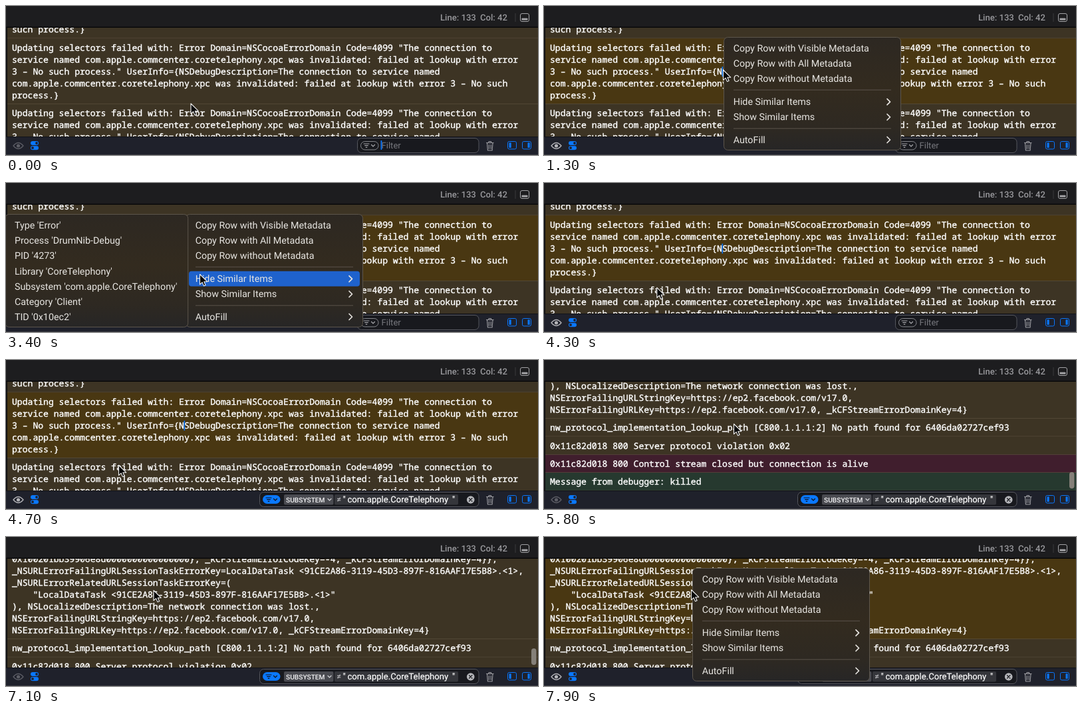
These frames come from a looping animation (800x226 px, 8000 ms). An HTML page:

```html
<!DOCTYPE html>
<html lang="en">
<head>
<meta charset="utf-8">
<title>Console filtering</title>
<style>
  html, body { margin: 0; width: 100%; height: 100%; overflow: hidden; background: #1d1d1f; }
  svg { display: block; width: 800px; height: 226px; }
  text { white-space: pre; text-rendering: geometricPrecision; }
  .log { font: 500 13.08px "Noto Sans Mono", "DejaVu Sans Mono", monospace; fill: #fff; stroke: #fff; stroke-width: 0.4px; }
  .menu { font: 14.3px Roboto, "Open Sans", sans-serif; fill: #e8e6e2; }
  .ui { font: 13.1px Roboto, "Open Sans", sans-serif; }
  .status { font: 500 13.1px Roboto, "Open Sans", sans-serif; fill: #98989c; }
  .token { font: 13.1px Roboto, "Open Sans", sans-serif; fill: #fff; stroke: #fff; stroke-width: 0.2px; }
  .tag { font: 500 10.2px Roboto, "Open Sans", sans-serif; fill: #f2f2f4; }
</style>
</head>
<body>
<svg id="stage" viewBox="0 0 800 226"></svg>
<script>
const LOOP = 8000, LINE = 18, PAD = 9.4, TOP = 33, BOTTOM = 198;
const BROWN = '#3d3424', PICKED = '#493712', RED = '#401e2d', GREEN = '#26392f';
const BLUE = '#0a78ff', ACCENT = '#1f62cc', BAR = '#1f212b';
const stage = document.getElementById('stage');

function el(tag, attrs, parent = stage, text) {
  const node = document.createElementNS('http://www.w3.org/2000/svg', tag);
  for (const key in attrs) node.setAttribute(key, attrs[key]);
  if (text !== undefined) node.textContent = text;
  return parent.appendChild(node);
}
const group = (parent = stage) => el('g', {}, parent);
const box = (x, y, width, height, fill, parent, rx = 0, stroke = 'none') =>
  el('rect', { x, y, width, height, fill, rx, stroke }, parent);
const stroke = (d, color, parent, width = 1.2) =>
  el('path', { d, fill: 'none', stroke: color, 'stroke-width': width, 'stroke-linecap': 'round', 'stroke-linejoin': 'round' }, parent);
const label = (x, y, text, cls, parent, fill) => {
  const node = el('text', { x, y, class: cls }, parent, text);
  if (fill) node.setAttribute('fill', fill);
  return node;
};
const show = (node, on) => node.setAttribute('display', on ? 'inline' : 'none');
const move = (node, x, y) => node.setAttribute('transform', `translate(${x} ${y})`);

// Console contents
const service = 'com.apple.commcenter.coretelephony.xpc was invalidated: failed at lookup with error';
const selectors = [
  'Updating selectors failed with: Error Domain=NSCocoaErrorDomain Code=4099 "The connection to',
  `service named ${service}`,
  '3 – No such process." UserInfo={NSDebugDescription=The connection to service named',
  `${service} 3 – No such`,
  'process.}'
];
const task = 'LocalDataTask <91CE2A86-3119-45D3-897F-816AAF17E5B8>.<1>';
const host = 'https://ep2.facebook.com/v17.0';
const network = [
  `Task <91CE2A86-3119-45D3-897F-816AAF17E5B8>.<1> finished with error [-1005] Error`,
  'Domain=NSURLErrorDomain Code=-1005 "The network connection was lost."',
  'UserInfo={_kCFStreamErrorCodeKey=-4, NSUnderlyingError=0x281d0a3d0 {Error',
  'Domain=kCFErrorDomainCFNetwork Code=-1005 "(null)"',
  'UserInfo={NSErrorPeerAddressKey=<CFData 0x2836e8b40>{length = 16, capacity = 16, bytes =',
  '0x100201bb39906e8d0000000000000000}, _kCFStreamErrorCodeKey=-4, _kCFStreamErrorDomainKey=4}},',
  `_NSURLErrorFailingURLSessionTaskErrorKey=${task},`,
  '_NSURLErrorRelatedURLSessionTaskErrorKey=(',
  `    "${task}"`,
  '), NSLocalizedDescription=The network connection was lost.,',
  `NSErrorFailingURLStringKey=${host},`,
  `NSErrorFailingURLKey=${host}, _kCFStreamErrorDomainKey=4}`
];

const rowHeight = lines => lines.length * LINE + PAD;

function drawRows(rows, y, parent) {
  return rows.map(([lines, fill]) => {
    const height = rowHeight(lines);
    const back = box(2, y, 798, height, fill, parent);
    lines.forEach((line, i) => label(9, y + 18.3 + i * LINE, line, 'log', parent));
    box(2, y + height - 0.6, 798, 1, '#5f5441', parent);
    y += height;
    return back;
  });
}

box(0, 0, 800, 226, '#1d1d1f');
const defs = el('defs', {});
const clip = el('clipPath', { id: 'console' }, defs);
box(0, TOP, 800, BOTTOM - TOP, '#fff', clip);
const glass = el('linearGradient', { id: 'glass', x1: 0, y1: 0, x2: 0, y2: 1 }, defs);
[[0, '#2d2822'], [0.45, '#332b1f'], [0.8, '#2e2922'], [1, '#272626']].forEach(
  ([offset, color]) => el('stop', { offset, 'stop-color': color }, glass));
const view = el('g', { 'clip-path': 'url(#console)' });

const allList = group(view);
const cut = [...selectors.slice(0, 3), selectors[3].replace(' such', ''), 'such process.}'];
const allRows = drawRows([[cut, BROWN], [selectors, BROWN], [selectors, BROWN]], 49.2 - rowHeight(cut), allList);
const textCaret = box(267.5, 92, 1.6, 15, BLUE, allList);

const tailList = group(view);
const tail = [
  [network, BROWN],
  [['nw_protocol_implementation_lookup_path [C800.1.1.1:2] No path found for 6406da02727cef93'], BROWN],
  [['0x11c82d018 800 Server protocol violation 0x02'], BROWN],
  [['0x11c82d018 800 Control stream closed but connection is alive'], RED],
  [['Message from debugger: killed'], GREEN]
];
const tailHeight = tail.reduce((sum, [lines]) => sum + rowHeight(lines), 0);
const tailRows = drawRows(tail, BOTTOM + 0.4 - tailHeight, tailList);
const thumb = box(790, 170, 7.5, 25, '#858079', view, 3.7);

// Window chrome
box(0, 31.5, 800, 1.5, '#09090a');
box(0, TOP, 2, BOTTOM - TOP, '#101012');
label(653, 21.7, 'Line: 133', 'status');
label(713, 21.7, 'Col: 42', 'status');
box(765.5, 11, 1, 13, '#3a3a3d');
box(773.5, 11.5, 13, 12, 'none', stage, 2.5, '#a5a5a8');
box(775.5, 18.5, 9, 3, '#a5a5a8', stage, 0.8);

box(0, BOTTOM, 800, 28, BAR);
box(0, BOTTOM, 800, 1, '#111218');
box(0, 225, 800, 1, '#36373d');
const eye = group();
stroke('M11 212 Q18.5 203 26 212 Q18.5 221 11 212Z', 'currentColor', eye, 1.3);
el('circle', { cx: 18.5, cy: 212, r: 2.6, fill: 'currentColor' }, eye);
box(37, 205, 12, 6, BLUE, stage, 3);
el('circle', { cx: 46, cy: 208, r: 1.9, fill: BAR });
box(37, 212.2, 12, 6, BLUE, stage, 3);
el('circle', { cx: 40, cy: 215.2, r: 1.9, fill: BAR });

stroke('M722.5 207.5H733 M726 207V205.5H729.5V207 M723.5 208L724.4 219H731.1L732 208 M726.3 210.5V216.5 M729.2 210.5V216.5', '#a0a0a5', stage, 1.1);
for (const [x, bar] of [[754.5, 756.5], [776.5, 784.5]]) {
  box(x, 205.5, 13, 11.5, 'none', stage, 2.2, BLUE);
  box(bar, 207.3, 3.2, 7.8, BLUE, stage, 0.6);
}

// Filter field, empty and filled
function filterIcon(x, color, parent) {
  stroke(`M${x} 209H${x + 8} M${x + 1.7} 211.7H${x + 6.3} M${x + 3.2} 214.3H${x + 4.8} M${x + 11.5} 210.5L${x + 14} 213L${x + 16.5} 210.5`, color, parent, 1.2);
}
const emptyField = group();
box(528.5, 200.5, 182.5, 22, '#18191e', emptyField, 6, '#55565d');
box(533.5, 205.5, 26.5, 12.5, 'none', emptyField, 6.2, '#85868b');
filterIcon(538, '#a3a4a8', emptyField);
label(564.5, 216.2, 'Filter', 'ui', emptyField, '#77787e');
const fieldCaret = box(563.5, 204, 1.8, 14, BLUE, emptyField);

const filledField = group();
box(381.5, 200.5, 329.5, 22, '#18191e', filledField, 6, '#55565d');
box(386, 205, 26.5, 13, BLUE, filledField, 6.5);
filterIcon(391, '#10131c', filledField);
box(418, 204, 74.5, 15.5, '#4a4b51', filledField, 2);
label(421, 215.5, 'SUBSYSTEM', 'tag', filledField);
stroke('M484 210.5L486.5 213L489 210.5', '#d0d0d3', filledField, 1.3);
box(494, 204, 186, 15.5, '#35363b', filledField, 2);
label(497, 216, '≠', 'ui', filledField, '#c9c9cc');
label(506.5, 216, '"', 'token', filledField);
label(513.5, 216, 'com.apple.CoreTelephony', 'token', filledField);
label(671, 216, '"', 'token', filledField);
el('circle', { cx: 698.7, cy: 212, r: 5.8, fill: '#b5b6ba' }, filledField);
stroke('M696.5 209.8L700.9 214.2M700.9 209.8L696.5 214.2', '#1c1d22', filledField, 1.3);

// Menus
function makeMenu(width, items, dividers) {
  const g = group();
  box(0.5, 47.5, width - 1, 171, 'url(#glass)', g, 6, '#5d564c');
  const bar = box(5, 0, width - 10, 23, ACCENT, g, 4);
  dividers.forEach(y => box(15, y, width - 30, 1, '#5a534a', g));
  items.forEach(([text, y, more]) => {
    label(14.7, y + 4.9, text, 'menu', g);
    if (more) stroke(`M${width - 21} ${y - 4.5}l4.5 4.5l-4.5 4.5`, '#e6e3df', g, 1.7);
  });
  return { g, bar, items };
}
const rootItems = [
  ['Copy Row with Visible Metadata', 64], ['Copy Row with All Metadata', 87.2], ['Copy Row without Metadata', 110.4],
  ['Hide Similar Items', 145.3, true], ['Show Similar Items', 168.5, true], ['AutoFill', 203, true]
];
const subItems = [
  "Type 'Error'", "Process 'DrumNib-Debug'", "PID '4273'", "Library 'CoreTelephony'",
  "Subsystem 'com.apple.CoreTelephony'", "Category 'Client'", "TID '0x10ec2'"
].map((text, i) => [text, 64 + i * 23.2]);
const root = makeMenu(267, rootItems, [126.8, 185.3]);
const sub = makeMenu(276, subItems, []);
move(sub.g, -1.8, 0);

function highlight(menu, item, color = ACCENT) {
  show(menu.bar, item);
  if (!item) return;
  menu.bar.setAttribute('y', item[1] - 11.6);
  menu.bar.setAttribute('fill', color);
}
const hit = (menu, y) => menu.items.find(item => Math.abs(y - item[1]) < 11.6);

const cursor = el('path', {
  d: 'M0 0V15.4L3.6 12.1L6 17.6L8.6 16.5L6.3 11.2H11.2Z',
  fill: '#050505', stroke: '#f2f2f2', 'stroke-width': 1.1, 'stroke-linejoin': 'round'
});

// Motion
const ease = (t, from, to) => {
  const p = Math.min(1, Math.max(0, (t - from) / (to - from)));
  return p * p * (3 - 2 * p);
};
const path = [
  [0, 278, 148], [100, 278, 148], [300, 276, 141], [600, 276, 141], [1000, 269.5, 97], [1300, 269.5, 97],
  [2000, 313.5, 129], [2350, 318, 141], [2900, 318, 142], [3400, 291.5, 138.5], [4000, 170, 158],
  [4700, 169.5, 159.5], [4900, 169.5, 159.5], [5700, 285.5, 97], [5900, 285.5, 97], [6600, 222, 81],
  [7100, 222, 81], [7300, 221.5, 80], [8000, 221.5, 80]
];
function pointer(t) {
  const i = path.findIndex(key => key[0] > t);
  const [t0, x0, y0] = path[i - 1], [t1, x1, y1] = path[i];
  const p = ease(t, t0, t1);
  return [x0 + (x1 - x0) * p, y0 + (y1 - y0) * p];
}

function render(t) {
  const [x, y] = pointer(t);
  const filtered = t >= 4850;
  const firstMenu = t >= 1200 && t < 4200, lastMenu = t >= 7300;
  const subOpen = firstMenu && t >= 2450;
  const picked = filtered ? lastMenu : t >= 1200;

  show(allList, !filtered);
  show(tailList, filtered);
  show(thumb, filtered && !lastMenu);
  show(textCaret, t >= 1200);
  allRows[1].setAttribute('fill', picked ? PICKED : BROWN);
  tailRows[0].setAttribute('fill', picked ? PICKED : BROWN);
  eye.setAttribute('color', picked ? '#b4b4b8' : '#5c5d65');

  const shift = 150 * (1 - ease(t, 4850, 5500)) + 66.2 * ease(t, 6000, 7000);
  move(tailList, 0, shift);
  move(thumb, 0, -shift / 66);

  show(emptyField, t < 4400);
  show(filledField, t >= 4400);
  show(fieldCaret, t < 1200);

  show(root.g, firstMenu || lastMenu);
  show(sub.g, subOpen);
  const left = lastMenu ? 223 : 270;
  move(root.g, left, 0);
  const inSub = subOpen && x < 274;
  highlight(sub, inSub && hit(sub, y));
  if (inSub) highlight(root, rootItems[3], '#554e46');
  else highlight(root, x > left + 4 && hit(root, y));

  move(cursor, x, y);
}

const start = performance.now();
function tick() {
  render((performance.now() - start) % LOOP);
  requestAnimationFrame(tick);
}
tick();
</script>
</body>
</html>
```
